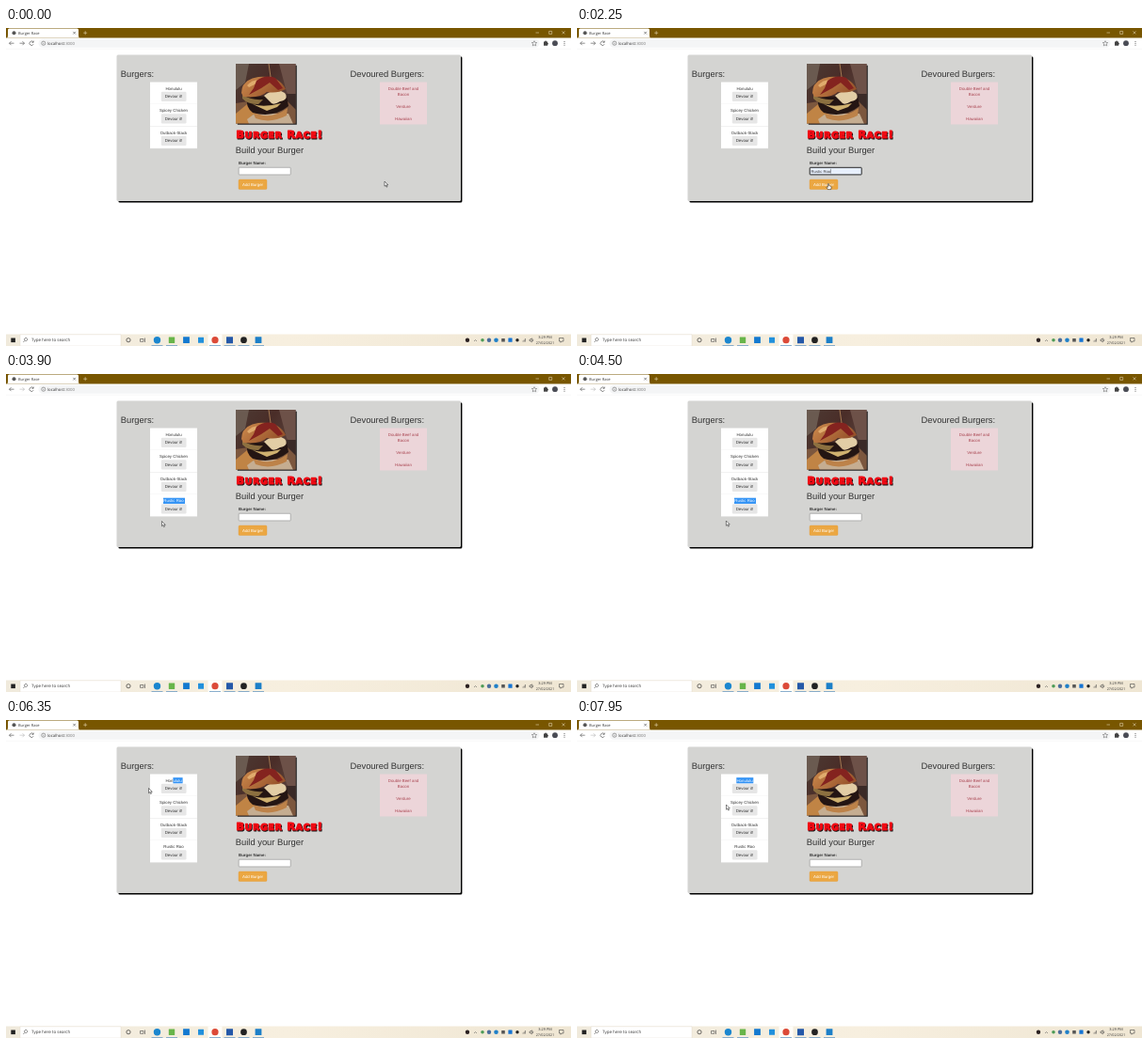
Write an HTML page that moves like this. It is 600 px wide and 338 px high and loops after 8 s.

```html
<!DOCTYPE html>
<html lang="en">
<head>
<meta charset="utf-8">
<title>Burger Race</title>
<style>
html, body { margin: 0; width: 100%; height: 100%; overflow: hidden; background: #fff; }
svg { display: block; width: 100vw; height: 100vh; }
text { font: 4.375px "Liberation Sans", Arial, sans-serif; fill: #333; text-rendering: geometricPrecision; }
.h { font-size: 9.375px; }
.mid { text-anchor: middle; }
.bold { font-weight: bold; }
.ui { font: 4.3px "Open Sans", sans-serif; }
.logo { font: 900 11px "DejaVu Sans", sans-serif; letter-spacing: .9px; stroke-width: 1.2px; stroke-linejoin: round; }
.logo tspan { font-size: 9.200px; }
.line { fill: none; stroke: #444; stroke-width: .6; }
.pale { fill: none; stroke: #f4ead0; stroke-width: .5; }
.red { fill: #a94450; }
</style>
</head>
<body>
<svg viewBox="0 0 600 338" preserveAspectRatio="none">
  <defs>
    <filter id="soft" x="-10%" y="-10%" width="120%" height="120%"><feGaussianBlur stdDeviation=".6"/></filter>
    <filter id="blur"><feGaussianBlur stdDeviation=".7"/></filter>
    <linearGradient id="wall" x2="1" y2=".6">
      <stop stop-color="#4c3a33"/><stop offset=".5" stop-color="#4a2d28"/><stop offset="1" stop-color="#5d4740"/>
    </linearGradient>
    <linearGradient id="bun" x2="1" y2=".5"><stop stop-color="#cf8d4e"/><stop offset="1" stop-color="#96522b"/></linearGradient>
    <linearGradient id="bar"><stop stop-color="#f0eadc"/><stop offset=".5" stop-color="#f7efdf"/><stop offset="1" stop-color="#efe6d3"/></linearGradient>
    <clipPath id="frame"><path d="M244 38h63.500v63.500H244z"/></clipPath>
  </defs>

  <!-- browser -->
  <path d="M0 0h600v10.500H0z" fill="#785600"/>
  <path d="M1 10.500Q2 10 2 8V2q0-1.500 1.500-1.500h72q1.500 0 1.500 1.500v6q0 2 1 2.500z" fill="#fff"/>
  <circle cx="8.500" cy="5.300" r="2" fill="#555"/>
  <text class="ui" x="13" y="6.900" style="font-size:4px">Burger Race</text>
  <path class="line" d="M71.300 3.900l2.600 2.600m0-2.600l-2.600 2.600"/>
  <path class="pale" d="M82.200 5.200h4m-2-2v4M562.500 5h3.500M576.700 3.400h3v3h-3zM590.500 3.400l3 3m0-3l-3 3"/>
  <rect x="34.500" y="11.700" width="532" height="9" rx="4.500" fill="#f4f5f6"/>
  <path class="line" d="M8.500 16.200h-5m2-2l-2 2l2 2M29 15a2.200 2.200 0 1 0 .2 2.100M29.200 13.500v1.800h-1.800"/>
  <path class="line" id="forward" d="M14.500 16.200h5m-2-2l2 2l-2 2"/>
  <circle class="line" cx="39.800" cy="16.200" r="2.100" style="stroke-width:.45"/>
  <path class="line" d="M39.800 15.900v1.400m0-2.600v.5" style="stroke-width:.45"/>
  <text class="ui" x="44" y="17.800">localhost<tspan fill="#777">:3000</tspan></text>
  <path class="line" d="M561 13.700l.8 1.700l1.900.2l-1.400 1.300l.4 1.900l-1.700-.9l-1.700.9l.4-1.900l-1.400-1.300l1.900-.2z" style="stroke-width:.45"/>
  <path d="M571 14.500h1.200a.9.900 0 0 1 1.800 0h1.200v1.500a.8.800 0 0 1 0 1.600v1.200H571z" fill="#444"/>
  <circle cx="583" cy="16.200" r="2.900" fill="#4a4c55"/>
  <path d="M593 14v.9m0 1v.9m0 1v.9" stroke="#444" stroke-width=".9"/>
  <path d="M0 22.200h600" stroke="#ebebeb" stroke-width=".4"/>

  <!-- page -->
  <rect x="119.400" y="30.300" width="365" height="155.200" rx="1.500" filter="url(#soft)"/>
  <rect x="117.500" y="28.500" width="365.500" height="155.500" rx="1.500" fill="#d4d4d2"/>
  <text class="h" x="121.800" y="52.300">Burgers:</text>
  <text class="h" x="365.500" y="52.300">Devoured Burgers:</text>
  <g id="list"></g>
  <path d="M397 57.500h50v45h-50z" fill="#ecd5d9"/>
  <g id="eaten"></g>

  <path d="M245.800 39.800h63v63h-63z" fill="#222" filter="url(#soft)"/>
  <g clip-path="url(#frame)">
    <path d="M244 38h64v64h-64z" fill="url(#wall)"/>
    <g filter="url(#blur)">
      <path d="M244 38h14l-4 20-10 8z" fill="#6a5a50"/>
      <path d="M290 38h18v42l-10-12z" fill="#6d5148"/>
      <path d="M298 70h10v22l-10-4z" fill="#3a2a27"/>
      <path d="M244 80l20-3h34l10 10v15h-64z" fill="#7c573e"/>
      <path d="M244 91l12-10 8 8-4 13h-16z" fill="#c08445"/>
      <path d="M256 97l8-6h36l5 11h-47z" fill="#c5ad91"/>
      <path d="M262 89q18 10 37-4l-1 8q-17 9-33 3z" fill="#bd8249"/>
      <path d="M256 73l42-1 2 11q-16 13-38 7-8-6-6-17z" fill="#241513"/>
      <path d="M274 72q12-9 22-3 5 7-5 9-6 4-9 2z" fill="#e2cda5"/>
      <path d="M262 81q12 4 30-1l-4 4-11 4z" fill="#cfb06f"/>
      <path d="M251 71q9 6 22 5l-5 5q-12 0-17-6z" fill="#8c7040"/>
      <path d="M250 69q0-14 18-17 22-2 29 13-9 5-20 3-7 7-25 5z" fill="url(#bun)"/>
      <path d="M256 61q5-6 13-6l-5 5-6 3z" fill="#e0ab6d"/>
      <path d="M266 56q10-7 20-3l8 11-5 2-9-8-9 6-13 7 5-7z" fill="#84231f"/>
    </g>
    <path d="M279 38l2 14" stroke="#b98b5c" stroke-width=".8"/>
  </g>

  <g id="logo"></g>
  <text class="h" x="243.800" y="133.400">Build your Burger</text>
  <text class="bold" x="247" y="144.800">Burger Name:</text>
  <rect id="field" x="247.200" y="148.300" width="55" height="7.600" rx=".6" fill="#fff"/>
  <text id="typed" x="248.600" y="153.600" style="font-size:4.200px"></text>
  <path id="caret" stroke="#222" stroke-width=".4"/>
  <rect x="247" y="161" width="30" height="10.500" rx="1.300" fill="#eba742" stroke="#e39a33" stroke-width=".4"/>
  <text class="mid" x="262" y="167.800" style="fill:#fff">Add Burger</text>
  <g id="drop">
    <rect x="247" y="157" width="60" height="16.200" rx="1" fill="#999" filter="url(#soft)"/>
    <rect x="247" y="156.600" width="59.500" height="16" rx="1" fill="#fff"/>
    <text class="ui" x="250.800" y="166.200" style="fill:#111">Rustic Roo</text>
  </g>

  <!-- taskbar -->
  <path d="M0 325.500h600V338H0z" fill="url(#bar)"/>
  <path d="M15 325.800h107V338H15z" fill="#fff" stroke="#ddd5c4" stroke-width=".4"/>
  <path d="M214.500 325.500h15V338h-15z" fill="#fffdf8"/>
  <path d="M5.300 329.500h4.600v4.600H5.300z" fill="#222"/>
  <path class="line" d="M18.300 334l1.800-1.800a1.600 1.600 0 1 1 .3.200"/>
  <text class="ui" x="27" y="333.400" style="font-size:4.500px">Type here to search</text>
  <circle class="line" cx="130" cy="331.700" r="2.100" style="stroke:#111"/>
  <path class="line" d="M142.500 330.500h3.500v2.800h-3.500zM147.500 329.500v4.500"/>
  <g id="apps"></g>
  <path class="line" d="M497 333l1.500-1.500 1.500 1.500" style="stroke-width:.5"/>
  <path class="line" d="M549 333.500v-1m1.200 1v-2m1.200 2v-3.500M556 331h1l1.300-1.200v4l-1.300-1.200h-1zM559.300 330.500q1 1.300 0 2.600"/>
  <text class="ui mid" x="572.500" y="330.400" style="font-size:3.900px">3:29 PM</text>
  <text class="ui mid" x="572.500" y="336" style="font-size:3.700px">27/02/2021</text>
  <path class="line" d="M587.500 329.500h4.500v3.500h-2l-1 1.200v-1.200h-1.500z"/>

  <!-- pointers -->
  <g id="pointer">
    <path id="arrow" d="M0 0v5.200l1.200-1.100.9 2 .9-.4-.9-1.900h1.700z" fill="#fff" stroke="#111" stroke-width=".5"/>
    <path id="beam" d="M-1.200-2.600h2.400M0-2.600v5.200M-1.200 2.600h2.400" stroke="#222" stroke-width=".6"/>
    <path id="hand" d="M-.6.300q.6-.7 1.200 0v2l2 .5q.7.300.6 1l-.5 2.400H-.6L-2 4q0-.9 1.400 0z" fill="#fff" stroke="#111" stroke-width=".5"/>
  </g>
</svg>
<script>
const $ = id => document.getElementById(id);
const show = (id, on) => $(id).style.display = on ? "" : "none";

// Each name is split where a text selection can begin.
const burgers = [["Hon", "ululu"], ["Spicey Chicken", ""], ["Outback-Stack", ""], ["", "Rustic Roo"]];
$("list").innerHTML = burgers.map(([head, tail], i) => `
  <g id="row${i}" transform="translate(0 ${i * 23.5})">
    <path d="M153 57.500h50v23.500h-50z" fill="#fff"/>
    <path d="M153 81h50" stroke="#ddd" stroke-width=".4"/>
    <rect id="mark${i}" y="61.200" height="6.200" fill="#3192f5"/>
    <text class="mid" x="178" y="65.900"><tspan id="head${i}">${head}</tspan><tspan id="tail${i}">${tail}</tspan></text>
    <rect x="164.800" y="67.700" width="26.700" height="10.300" rx="1.200" fill="#e6e6e6"/>
    <text class="mid" x="178" y="74.400">Devour it!</text>
  </g>`).join("");

$("eaten").innerHTML = [["Double Beef and", 66], ["Bacon", 72.200], ["Verdure", 85], ["Hawaiian", 97.700]]
  .map(([s, y]) => `<text class="mid red" x="422" y="${y}">${s}</text>`).join("");

$("logo").innerHTML = [["#111", 245.3, 118], ["#f00a14", 244.5, 117.2]].map(([c, x, y]) =>
  `<text class="logo" x="${x}" y="${y}" style="fill:${c};stroke:${c}">B<tspan>URGER</tspan> R<tspan>ACE</tspan>!</text>`).join("");

// x, colour, radius, round, running
const apps = [
  [160.5, "#1b86cf", 3.7, 1, 1], [176, "#68b54a", 3.2, 0, 1], [191.5, "#1479d0", 3.4, 0, 0],
  [207, "#2190dc", 3, 0, 0], [222, "#dc4a38", 3.6, 1, 1], [237.5, "#2458a8", 3.5, 0, 1],
  [252.5, "#222", 3.4, 1, 1], [268, "#1c7fc8", 3.4, 0, 1], [490, "#2a2020", 2.2, 1, 0],
  [506, "#4d9b56", 1.8, 1, 0], [513, "#4a6d9c", 2.2, 1, 0], [520.5, "#2080c8", 2.3, 1, 0],
  [528, "#555", 1.8, 0, 0], [535.5, "#1474d4", 2.1, 0, 0], [543, "#222", 1.7, 1, 0]
];
$("apps").innerHTML = apps.map(([x, c, r, round, on]) =>
  `<rect x="${x - r}" y="${331.7 - r}" width="${2 * r}" height="${2 * r}" rx="${round ? r : .3}" fill="${c}"/>` +
  (on ? `<path d="M${x - 6} 337.500h12" stroke="#6d9cc4" stroke-width=".8"/>` : "")).join("");

// time, x, y
const path = [
  [0, 402, 163], [100, 402, 163], [850, 288, 153], [1200, 287, 155], [1750, 287, 155],
  [2050, 268, 165], [2200, 268, 165], [2400, 261.5, 167.5], [3030, 261.5, 167.5],
  [3350, 186, 157], [3400, 186, 157], [3500, 169, 137], [3700, 169, 137], [3900, 165.5, 156.5],
  [4200, 165.5, 156.5], [4550, 158, 156], [5250, 351, 73], [5400, 351, 73],
  [6200, 177, 65], [6350, 151.5, 72.5], [6450, 151.5, 72.5], [6700, 164, 65],
  [7100, 155, 88], [7350, 151, 105], [7650, 160, 121], [7800, 160, 121], [7950, 158.5, 90], [8000, 158.5, 90]
];

function pointerAt(t) {
  const i = path.findIndex(p => p[0] > t), [t0, x0, y0] = path[i - 1], [t1, x1, y1] = path[i];
  const u = (t - t0) / (t1 - t0), e = u * u * (3 - 2 * u);
  return [x0 + (x1 - x0) * e, y0 + (y1 - y0) * e];
}

function select(row, x, w, headOn, tailOn) {
  const mark = $("mark" + row);
  mark.setAttribute("x", x);
  mark.setAttribute("width", w);
  $("head" + row).style.fill = headOn ? "#fff" : "";
  $("tail" + row).style.fill = tailOn ? "#fff" : "";
}

function draw(t) {
  const within = (a, b) => t >= a && t < b;
  const [x, y] = pointerAt(t);
  const list = within(1150, 2150), focus = within(900, 2450), added = t >= 2600;
  const inField = x > 247 && x < 302 && y > 148 && y < 156.5;
  const onButton = x > 247 && x < 277 && y > 161 && y < 171.5 && !list;

  $("typed").textContent = list ? "R" : within(2150, 2600) ? "Rustic Roo" : "";
  $("field").setAttribute("stroke", focus ? "#111" : "#777");
  $("field").setAttribute("stroke-width", focus ? .9 : .5);
  $("field").setAttribute("fill", within(2150, 2600) ? "#e8f0fe" : "#fff");
  $("caret").setAttribute("d", `M${list ? 252 : t < 1150 ? 248.8 : 269.5} 149.800v4.700`);
  $("forward").style.opacity = added ? .4 : 1;
  show("caret", focus);
  show("drop", list);
  show("row3", added);

  const roo = within(3800, 4600), all = t >= 6650, part = t >= 6300;
  select(3, 167, roo ? 23 : 0, 0, roo);
  select(0, all ? 169.3 : 177.4, all ? 18 : part ? 10.2 : 0, all, part);

  $("pointer").setAttribute("transform", `translate(${x} ${y})`);
  show("beam", inField);
  show("hand", onButton);
  show("arrow", !inField && !onButton);
}

function tick() {
  draw(performance.now() % 8000);
  requestAnimationFrame(tick);
}
tick();
</script>
</body>
</html>
```
